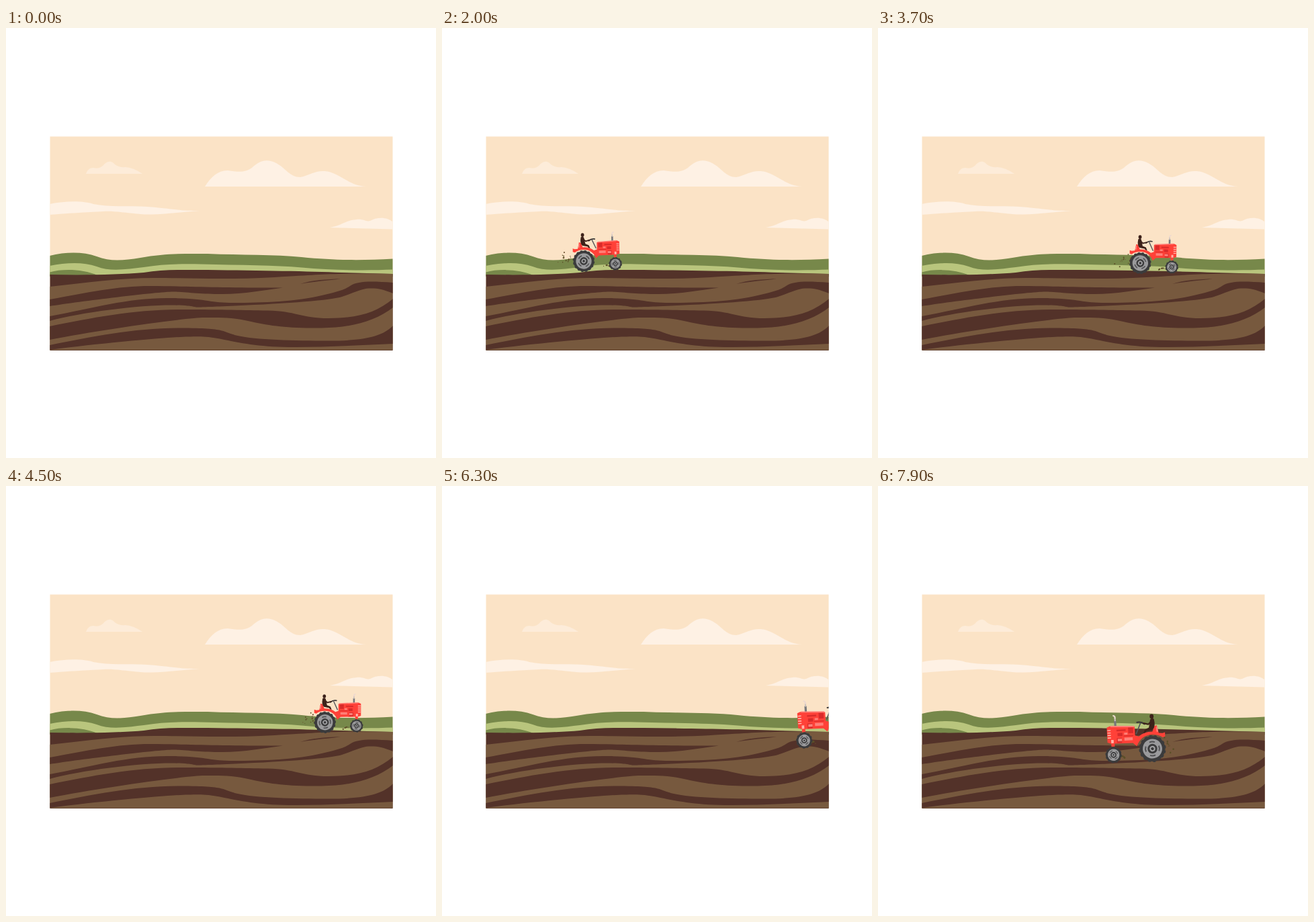
Write an HTML page that moves like this. It is 640 px wide and 640 px high and loops after 8 s.

```html
<!DOCTYPE html>
<html lang="en">
<head>
<meta charset="utf-8">
<title>Tractor in the field</title>
<style>
  html, body { margin: 0; width: 100%; height: 100%; overflow: hidden; background: #fff; }
  svg { display: block; width: 100vw; height: 100vh; }
</style>
</head>
<body>
<svg viewBox="0 0 640 640">
  <defs>
    <clipPath id="view"><path d="M65.5 161.5H575.5V480H65.5Z"/></clipPath>
  </defs>
  <g clip-path="url(#view)">
    <path fill="#fbe3c6" d="M65 161H576V480H65Z"/>
    <path fill="#fdecd9" d="M119 217Q122 208 130 208Q140 211 147 202Q155 195 162 203Q168 208 178 207Q190 208 203 217Z"/>
    <g fill="#fef1e4">
      <path d="M296 236C305 222 315 212 330 212C345 214 355 216 366 208C378 197 388 194 402 201C416 208 422 222 438 222C452 219 460 212 474 213C495 214 510 235 536 236Z"/>
      <path d="M65 262C90 257 115 257 130 262C155 267 180 264 210 266C240 268 255 272 288 272C250 275 225 279 200 277C175 275 160 272 145 273C120 274 90 276 65 278Z"/>
      <path d="M482 297C500 294 505 286 522 285C532 284 536 289 542 287C552 281 568 281 576 289V299.5Z"/>
    </g>
    <g fill="#77884a">
      <path d="M65 339C90 333 115 333 135 340C155 348 175 346 200 342C240 335 270 336 300 336C350 338 400 337 440 341C490 346 530 346 576 343.5V370H65Z"/>
      <path fill="#b9c57d" d="M65 354C90 349 115 348 135 355C155 363 180 359 205 356C235 351 265 351 290 351.5C350 353 400 353 440 356.5C490 361 540 361 576 359.5V370H65Z"/>
      <path d="M65 363.5C85 358 115 359 136 368H65Z"/>
    </g>
    <g fill="#533229">
      <path d="M65 367C120 368 170 367 205 364C235 359 270 360 300 360C380 361 450 362 500 364L576 366V480H65Z"/>
      <path fill="#77593e" d="M65 385C120 379 170 372 220 372S330 375 400 371S470 366 540 365.5L576 366V479.5H65Z"/>
      <path d="M438 381C455 375 480 374 498 373.3C480 376 460 377 438 381Z"/>
      <path d="M65 404C120 394 165 384 215 384S320 387 412 386.5C385 390 355 396 322 396S270 393 250 392.5S110 407 65 414Z"/>
      <path d="M65 429C130 417 180 402 240 402S300 409 340 409S435 407 470 398C485 394 500 392 512 384S545 377 576 379V395C560 388 550 387 540 387.5S515 395 500 400S420 410 340 413.5S290 415 270 413.5C225 409 120 421 65 436Z"/>
      <path d="M65 444C130 431 190 419 260 419S350 420 390 420.5S440 432 480 432S550 425 576 403V416C550 436 515 446 470 446.5S395 444 365 437S320 431 295 431S140 449 65 464Z"/>
      <path d="M65 472C130 459 190 446.5 260 446.5S320 452 345 458S430 465.5 480 465.5S560 460 576 443V470C530 472 480 475 430 475S355 470 325 464S290 459.5 270 459.5S150 468 65 479Z"/>
    </g>
    <g id="tractor">
      <g id="dirt"></g>
      <g fill="none" stroke-linecap="round">
        <path stroke="#55565a" stroke-width="1.4" d="M13 -31L18.5 -19"/>
        <path stroke="#3c3838" stroke-width="1.7" d="M8 -30Q12 -33.5 17 -32.5"/>
        <path stroke="#77777a" stroke-width="2.6" stroke-linecap="butt" d="M43.1 -36V-28"/>
        <path stroke="#c9c0bc" stroke-width="1.7" d="M43.1 -36V-39"/>
        <path stroke="#eed9cf" stroke-width="1.6" d="M43.1 -39Q42.6 -41.5 45 -42"/>
      </g>
      <path fill="#ff4138" d="M-16 -19L-13 -18L-8.5 -18.5L-6.5 -28L-3.5 -27L-1 -20.5Q9 -21 15.5 -15.5L20 -17V-27.5L50 -29.5L53.5 -28V-10L49 -8.5V-5H45V-8.5L23 -8L18.5 -4Q13 -17 0 -17Q-8 -17 -13 -13L-16 -14Z"/>
      <path fill="#d92b2a" d="M22 -27H28V-20H22ZM31 -25H42V-23H31ZM35 -21H41V-17H35ZM22 -17.5H34V-16.5H22ZM36 -15H42V-9H36Z"/>
      <path fill="#ff8078" d="M21 -28.5L49 -30V-28.5L21 -27ZM23 -15H33V-11.5H23ZM29 -21H33V-18.5H29ZM36 -14H41V-11H36ZM-7 -26L-5.5 -26L-6 -20H-8Z"/>
      <path fill="none" stroke="#ffc3b6" stroke-width="1.1" d="M49 -24.5H53M49 -21.5H53M49 -18.5H53M49 -15.5H53"/>
      <path fill="#ffb5a9" d="M46 -13H49V-9H46Z"/>
      <g fill="#3d221a">
        <ellipse cx="-1" cy="-38.8" rx="2.4" ry="2.8"/>
        <path d="M-3.6 -35.5Q-1 -37.5 1 -35L3 -25.5L8 -23.5L10 -19L7.5 -19.5L6 -21.5L-1.5 -23Q-5.5 -26 -3.6 -35.5Z"/>
        <path fill="none" stroke="#3d221a" stroke-width="1.8" stroke-linecap="round" stroke-linejoin="round" d="M-0.5 -33L3.5 -29.5L9 -31"/>
      </g>
    </g>
  </g>
</svg>
<script>
const NS = 'http://www.w3.org/2000/svg';
const LOOP = 8000, STEP = 100;
const LEAVE = 5600, RETURN = 5800;   // out of view in between
const SPEED = 0.1055, BACK_SPEED = 0.1178, BACK_SIZE = 1.24;
const BASE = 47;                     // distance between the axles

const tractor = document.getElementById('tractor');
const dirt = document.getElementById('dirt');
const bump = (v, mid, width) => Math.exp(-(((v - mid) / width) ** 2) / 2);

function add(parent, tag, attrs) {
  const el = document.createElementNS(NS, tag);
  for (const k in attrs) el.setAttribute(k, attrs[k]);
  return parent.appendChild(el);
}

// Returns a function that turns the wheel to its angle at time t
function wheel(cx, cy, r, lugs) {
  const hold = add(tractor, 'g', { transform: `translate(${cx} ${cy})` });
  const spin = add(hold, 'g', {});
  const disc = (size, color) => add(spin, 'circle', { r: size * r, fill: color });
  const dashes = (size, color, width, count) => add(spin, 'circle', {
    r: size * r, fill: 'none', stroke: color, 'stroke-width': width * r,
    pathLength: count * 2, 'stroke-dasharray': '1 1'
  });
  disc(0.95, '#3b3b3c');
  dashes(0.94, '#3b3b3c', 0.12, lugs);
  disc(0.72, '#9a9a9c');
  dashes(0.52, '#505052', 0.1, 4);
  disc(0.36, '#3b3b3c');
  disc(0.21, '#a5a5a7');
  disc(0.11, '#3b3b3c');
  return t => spin.setAttribute('transform', `rotate(${t * SPEED / r * 180 / Math.PI})`);
}
const wheels = [wheel(0, 0, 16.2, 16), wheel(BASE, 5, 9.8, 12)];

// Clods thrown back from both wheels
let seed = 11;
const rnd = () => (seed = seed * 16807 % 2147483647) / 2147483647;
const clods = Array.from({ length: 26 }, (_, i) => {
  const front = i > 17;
  return {
    el: add(dirt, 'circle', { r: 0.5 + rnd() * 0.7, fill: i % 3 ? '#5b4f28' : '#664a2b' }),
    x: front ? 40 : -12,
    y: front ? 10 : 6 - rnd() * 10,
    reach: front ? 13 : 16 + rnd() * 13,
    lift: front ? 4 : 5 + rnd() * 10,
    phase: rnd()
  };
});

function throwDirt(t, reach) {
  for (const c of clods) {
    const p = (t / 700 + c.phase) % 1;
    c.el.setAttribute('cx', c.x - c.reach * p * reach);
    c.el.setAttribute('cy', c.y - c.lift * 3 * p * (1 - p));
  }
}

// Over the low hill to the right
function going(t) {
  const ground = x => 352 - 7 * bump(x, 272, 76);
  const x = SPEED * t;
  const slope = Math.atan2(ground(x + BASE) - ground(x), BASE) * 180 / Math.PI;
  return { x, y: ground(x), tilt: slope * 0.6, size: '1' };
}

// Nearer and larger to the left, with one dip at the field's edge
function coming(t) {
  const left = 7900 - t, dip = bump(t, 6600, 120);
  return {
    x: 408.5 + BACK_SPEED * left,
    y: 391 - 0.0135 * left - 9 * dip,
    tilt: -3 - 9 * dip,
    size: `${-BACK_SIZE} ${BACK_SIZE}`
  };
}

function draw(t) {
  const away = t >= LEAVE && t < RETURN;
  tractor.setAttribute('visibility', away ? 'hidden' : 'visible');
  const { x, y, tilt, size } = t < LEAVE ? going(t) : coming(t);
  tractor.setAttribute('transform', `translate(${x} ${y}) rotate(${tilt}) scale(${size})`);
  wheels.forEach(turn => turn(t));
  throwDirt(t, t < LEAVE ? 1 : 0.5);
}

const start = performance.now();
function tick() {
  const t = (performance.now() - start) % LOOP;
  draw(Math.floor(t / STEP) * STEP);
  requestAnimationFrame(tick);
}
tick();
</script>
</body>
</html>
```
